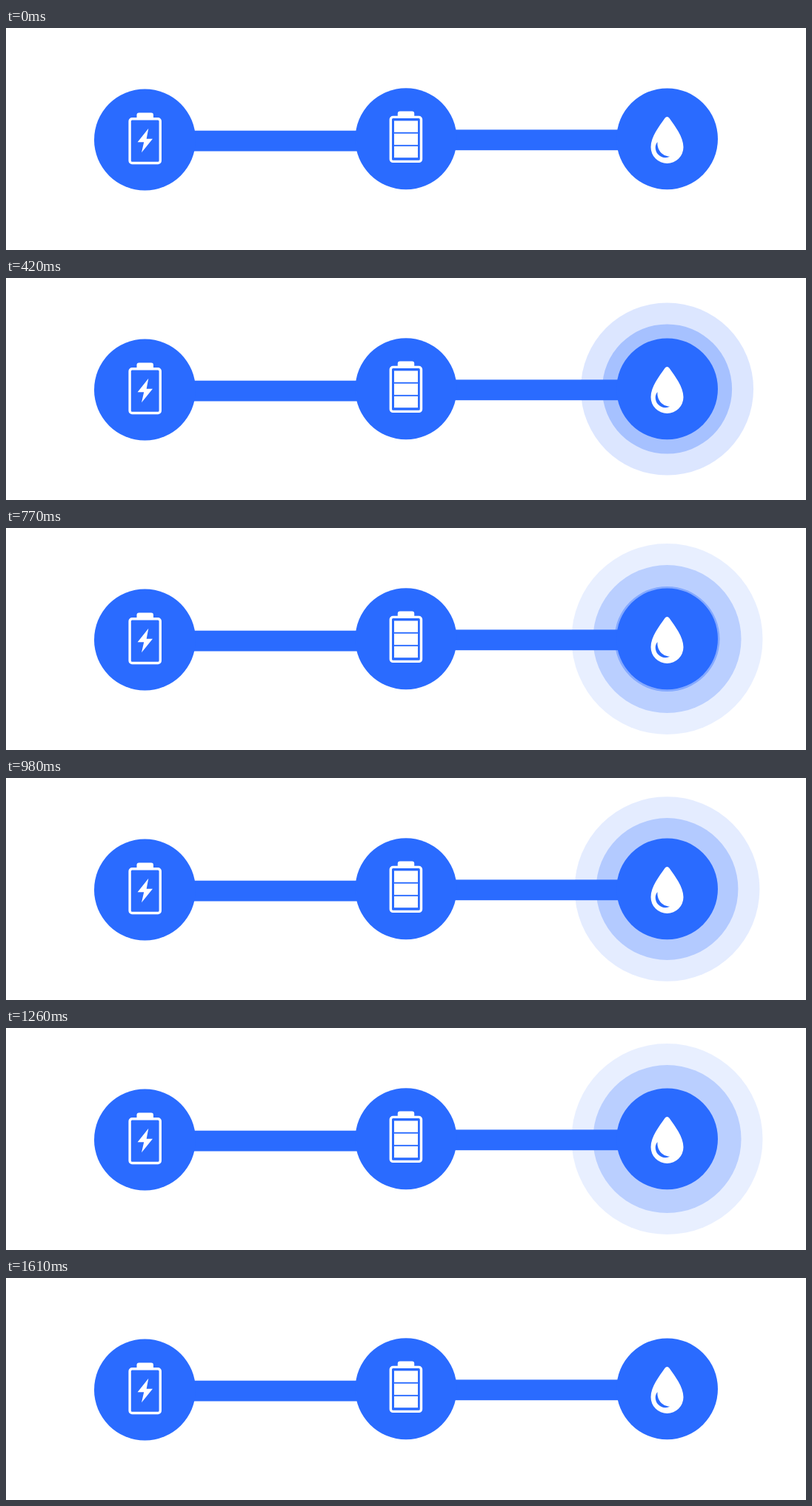
Recreate the animation shown at these times as an HTML page. Size 1080x300 px, loop 1.64 s.

```html
<!DOCTYPE html>
<html lang="en">
<head>
<meta charset="utf-8">
<title>Battery steps</title>
<style>
  html, body { margin: 0; width: 100%; height: 100%; overflow: hidden; background: #fff; }
  svg { display: block; width: 100%; height: 100%; }
</style>
</head>
<body>
<svg viewBox="0 0 1080 300">
  <g id="rings" fill="#2a6bff"></g>

  <g fill="#2a6bff">
    <rect x="187" y="138.7" width="353" height="27.8"/>
    <rect x="540" y="137.4" width="352" height="27.8"/>
    <circle cx="187.5" cy="151" r="68.5"/>
    <circle cx="540" cy="149.8" r="68.5"/>
    <circle cx="892.6" cy="149.8" r="68.4"/>
  </g>

  <!-- charging battery -->
  <g fill="#fff">
    <rect x="176.5" y="114.5" width="22.5" height="11" rx="3"/>
    <rect x="167.1" y="122.8" width="41.2" height="59.7" rx="3.2" fill="#2a6bff" stroke="#fff" stroke-width="3.4"/>
    <path d="M192.3 135.8L177.6 154.2H186.2L183 168.3L198 149.7H189.7Z"/>
  </g>

  <!-- full battery -->
  <g fill="#fff">
    <rect x="528.8" y="112.5" width="22.4" height="11" rx="3"/>
    <rect x="519.3" y="120.4" width="41.2" height="60" rx="3.2" fill="#2a6bff" stroke="#fff" stroke-width="3.4"/>
    <rect x="524" y="125.4" width="32" height="15.4"/>
    <rect x="524" y="142.7" width="32" height="15.2"/>
    <rect x="524" y="159.8" width="32" height="15.4"/>
  </g>

  <!-- drop -->
  <path fill="#fff" d="M892.5 120C894 120 895 121 896 122.5C903 132.5 914.5 147 914.5 161A22 22 0 0 1 870.5 161C870.5 147 882 132.5 889 122.5C890 121 891 120 892.5 120Z"/>
  <path fill="#2a6bff" d="M879.5 154C875.5 158 876 166 880 170.5C884.5 175.5 891.5 176.5 896 173.5C886 173.5 878.5 164.5 879.5 154Z"/>
</svg>
<script>
  const LOOP = 1640, STEP = 70, LAST = 1470, REST = 1610;
  const COUNT = 5, GAP = 245;      // one ripple leaves every GAP ms
  const GROW = 525, FADE = 105;    // ripple lifetime
  const R0 = 66.9, R1 = 129;

  const group = document.getElementById('rings');
  const rings = Array.from({ length: COUNT }, () => {
    const c = document.createElementNS('http://www.w3.org/2000/svg', 'circle');
    c.setAttribute('cx', 892.5);
    c.setAttribute('cy', 150);
    group.appendChild(c);
    return c;
  });

  // The motion ticks in steps; the last pose is held until the rest.
  function tick(ms) {
    const t = ms % LOOP;
    return t >= REST ? 0 : Math.min(Math.floor(t / STEP) * STEP, LAST);
  }

  function draw(ms) {
    const t = tick(ms);
    rings.forEach((ring, i) => {
      const age = t - i * GAP;
      const k = Math.min(Math.max(age / GROW, 0), 1);
      const fade = Math.min(Math.max(1 - (age - GROW) / FADE, 0), 1);
      ring.setAttribute('r', R0 + (R1 - R0) * k);
      ring.setAttribute('opacity', age > 0 ? (0.4 - 0.296 * k) * fade : 0);
    });
  }

  const start = performance.now();
  function frame() {
    draw(performance.now() - start);
    requestAnimationFrame(frame);
  }
  draw(0);
  requestAnimationFrame(frame);
</script>
</body>
</html>
```
